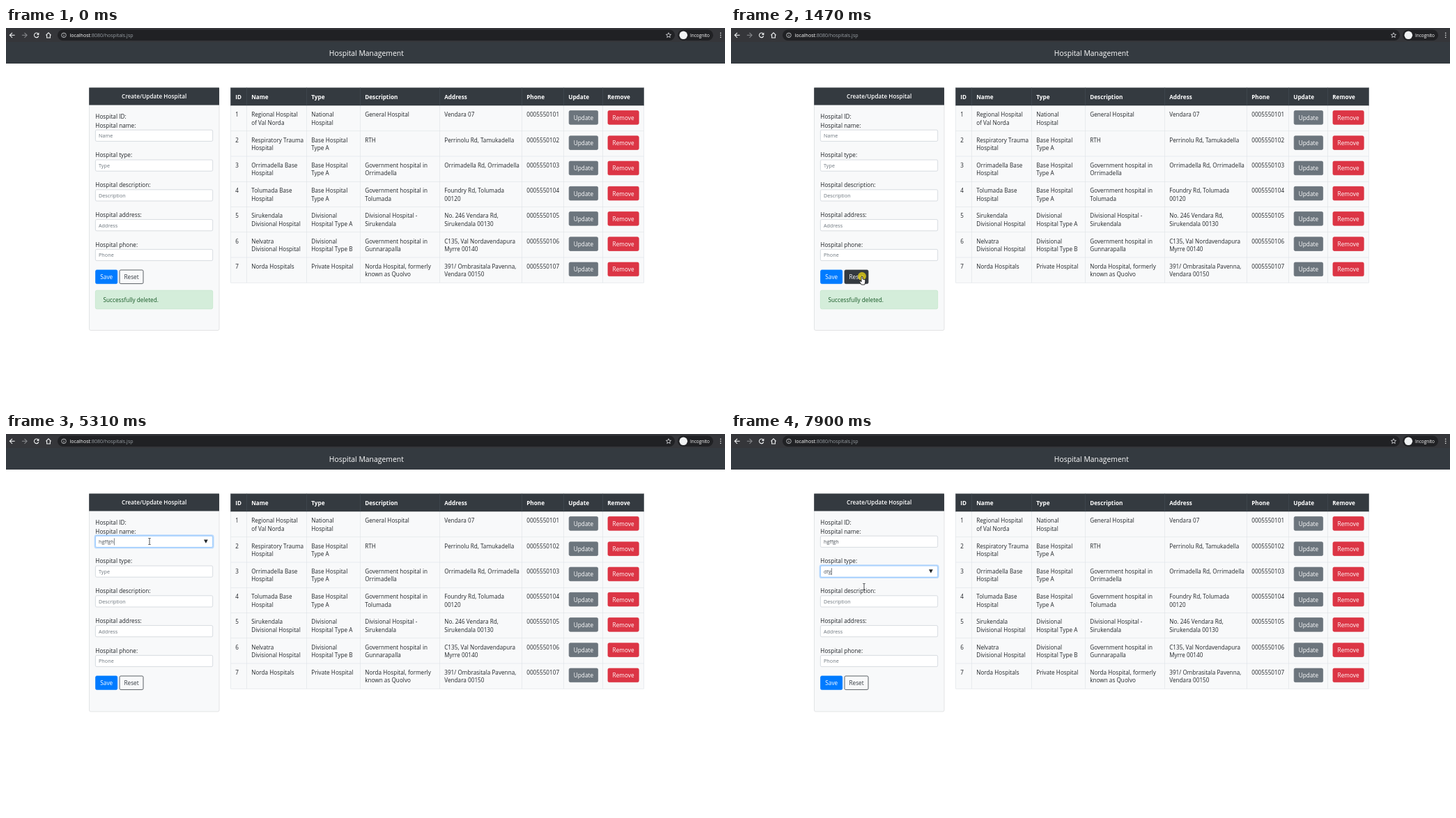
An HTML page with a canvas that plays this animation: 1032x542 px, repeating every 8 s.

```html
<!DOCTYPE html>
<html lang="en">
<head>
<meta charset="utf-8">
<title>Hospital Management</title>
<style>
  html, body { margin: 0; width: 100%; height: 100%; overflow: hidden; background: #fff; }
  canvas { display: block; }
</style>
</head>
<body>
<canvas id="stage" width="1032" height="542"></canvas>
<script>
const ctx = document.getElementById('stage').getContext('2d');
const LOOP = 8000, FIRST_STEP = 260, STEP = 93.2;
const DARK = '#343a40', INK = '#212529', LIGHT = '#f8f9fa', LINE = '#dee2e6';

const COLUMNS = [322.5, 345.5, 431.5, 508.5, 622.5, 740.5, 800.5, 856.5, 915.5];
const HEADINGS = ['ID', 'Name', 'Type', 'Description', 'Address', 'Phone', 'Update', 'Remove'];
const TABLE_TOP = 111.5, ROW_HEIGHT = 36.25;
const ROWS = [
  ['1', 'Regional Hospital\nof Val Norda', 'National\nHospital', 'General Hospital', 'Vendara 07', '0005550101'],
  ['2', 'Respiratory Trauma\nHospital', 'Base Hospital\nType A', 'RTH', 'Perrinolu Rd, Tamukadella', '0005550102'],
  ['3', 'Orrimadella Base\nHospital', 'Base Hospital\nType A', 'Government hospital in\nOrrimadella', 'Orrimadella Rd, Orrimadella', '0005550103'],
  ['4', 'Tolumada Base\nHospital', 'Base Hospital\nType A', 'Government hospital in\nTolumada', 'Foundry Rd, Tolumada\n00120', '0005550104'],
  ['5', 'Sirukendala\nDivisional Hospital', 'Divisional\nHospital Type A', 'Divisional Hospital -\nSirukendala', 'No. 246 Vendara Rd,\nSirukendala 00130', '0005550105'],
  ['6', 'Nelvatra\nDivisional Hospital', 'Divisional\nHospital Type B', 'Government hospital in\nGunnarapalla', 'C135, Val Nordavendapura\nMyrre 00140', '0005550106'],
  ['7', 'Norda Hospitals', 'Private Hospital', 'Norda Hospital, formerly\nknown as Quolvo', '391/ Ombrasitala Pavenna,\nVendara 00150', '0005550107']
];
const FIELDS = ['Name', 'Type', 'Description', 'Address', 'Phone'];
const FIELD_TOP = 146, FIELD_PITCH = 42.8, FIELD_HEIGHT = 16.6;
const ITEM_HEIGHT = 19.55;
const SUGGESTIONS = [
  ['Regional Hospital of Val Norda', 'Orrimadella Base Hospital', 'Tolumada Base Hospital',
    'Sirukendala Divisional Hospital', 'Nelvatra Divisional Hospital', 'Respiratory Trauma Hospital',
    'Belun Hospital', 'Ovenu Hospital', 'Norda Hospitals'],
  ['Private Hospital', 'National Hospital', 'Base Hospital Type A', 'Base Hospital Type B',
    'Divisional Hospital Type A', 'Divisional Hospital Type B']
];

// Pointer track: time, x, y
const TRACK = [
  [260, 436, 214], [540, 399, 256.8], [640, 372, 300], [730, 338, 385], [820, 302, 457],
  [910, 282, 446], [1010, 262, 416], [1110, 238, 392], [1300, 192, 360], [1400, 188, 356],
  [1870, 188, 356], [1960, 194, 325], [2230, 205, 152], [2690, 205, 152], [3000, 208, 171],
  [3250, 209, 175], [3530, 205, 155], [3810, 205, 156], [4090, 205, 156], [4180, 211, 150],
  [4450, 226, 131], [4540, 225, 133], [4920, 206, 154], [5500, 206, 154], [6060, 193, 198],
  [6420, 193, 198], [6700, 195, 217], [6900, 195, 217], [7080, 198, 224], [7360, 200, 199],
  [7730, 200, 199], [7900, 191, 219]
];
const PRESSES = [[1430, 1550], [2400, 2490], [6130, 6220]];
const RESET_AT = 1550, NAME_FOCUS = 2400, TYPE_FOCUS = 6130, TYPE_TYPED = 7520;
const NAME_KEYS = [4636, 4730, 4823, 4916, 5100, 5290];

const between = (v, a, b) => v >= a && v < b;
const fieldY = i => FIELD_TOP + i * FIELD_PITCH;

// Laid out large and scaled down so glyph spacing stays fractional.
function text(str, x, middle, size, color, { align = 'left', weight = 400 } = {}) {
  ctx.save();
  ctx.translate(x, middle + size * 0.36);
  ctx.scale(0.1, 0.1);
  ctx.font = `${weight} ${size * 10}px "Open Sans", "Noto Sans", sans-serif`;
  ctx.textAlign = align;
  ctx.fillStyle = color;
  ctx.fillText(str, 0, 0);
  const width = ctx.measureText(str).width / 10;
  ctx.restore();
  return width;
}

function box(x, y, w, h, r, fill, stroke, lineWidth = 0.8) {
  ctx.beginPath();
  ctx.roundRect(x, y, w, h, r);
  if (fill) { ctx.fillStyle = fill; ctx.fill(); }
  if (stroke) { ctx.strokeStyle = stroke; ctx.lineWidth = lineWidth; ctx.stroke(); }
}

function rect(x, y, w, h, fill) {
  ctx.fillStyle = fill;
  ctx.fillRect(x, y, w, h);
}

function poly(points, fill, stroke, lineWidth = 0.8, closed = true) {
  ctx.beginPath();
  points.forEach(([x, y]) => ctx.lineTo(x, y));
  if (closed) ctx.closePath();
  if (fill) { ctx.fillStyle = fill; ctx.fill(); }
  if (stroke) { ctx.strokeStyle = stroke; ctx.lineWidth = lineWidth; ctx.stroke(); }
}

function arc(x, y, r, fill, stroke, lineWidth = 1, from = 0, to = 7) {
  ctx.beginPath();
  ctx.arc(x, y, r, from, to);
  if (fill) { ctx.fillStyle = fill; ctx.fill(); }
  if (stroke) { ctx.strokeStyle = stroke; ctx.lineWidth = lineWidth; ctx.stroke(); }
}

function button(label, x, y, w, fill, color = '#fff', border = fill) {
  box(x, y, w, 19.6, 1.8, fill, border);
  text(label, x + w / 2, y + 10.2, 8.25, color, { align: 'center' });
}

function navArrow(x, dir, color) {
  poly([[x - 3.6 * dir, 10.3], [x + 3.6 * dir, 10.3]], null, color, 1.1, false);
  poly([[x, 6.8], [x + 3.6 * dir, 10.3], [x, 13.8]], null, color, 1.1, false);
}

function drawBrowser() {
  rect(0, 0, 1032, 20, '#35363a');
  box(74, 2.5, 886, 15.5, 7.7, '#202124');
  box(964, 2.5, 51, 15.5, 7.7, '#202124');
  navArrow(9, -1, '#f1f3f4');
  navArrow(26.5, 1, '#85878a');
  arc(43.7, 10.3, 3.2, null, '#f1f3f4', 1.1, 0.3, 5.5);
  poly([[47.4, 6.4], [47.4, 9.9], [43.9, 9.9]], '#f1f3f4');
  poly([[57.4, 10.4], [61, 6.8], [64.6, 10.4]], null, '#f1f3f4', 1.1, false);
  poly([[58.6, 9.8], [58.6, 14], [63.4, 14], [63.4, 9.8]], null, '#f1f3f4', 1.1, false);
  arc(83, 10.3, 3.3, null, '#d5d7da', 0.8);
  rect(82.6, 9.8, 0.8, 2.4, '#d5d7da');
  rect(82.6, 8.3, 0.8, 0.8, '#d5d7da');
  const host = text('localhost', 91.5, 10.4, 7.05, '#fff');
  text(':8080/hospitals.jsp', 91.5 + host, 10.4, 7.05, '#9aa0a6');
  const star = Array.from({ length: 10 }, (_, i) => {
    const a = i * Math.PI / 5 - Math.PI / 2, r = i % 2 ? 1.7 : 3.8;
    return [951 + r * Math.cos(a), 10.5 + r * Math.sin(a)];
  });
  poly(star, null, '#e1e3e6', 0.8);
  arc(972.3, 10.3, 5.8, '#f1f3f4');
  text('Incognito', 982, 10.4, 6.45, '#fff');
  for (const y of [7.3, 10.3, 13.3]) arc(1025.7, y, 0.8, '#f1f3f4');
  rect(0, 20, 1032, 31, DARK);
  text('Hospital Management', 517.3, 36.3, 10.4, '#fff', { align: 'center' });
}

function drawTable(pointer) {
  const left = COLUMNS[0], width = COLUMNS[8] - left;
  const inside = pointer && between(pointer.x, left, COLUMNS[8]);
  const hovered = inside ? Math.floor((pointer.y - TABLE_TOP) / ROW_HEIGHT) : -1;

  rect(left, 85.5, width, 26, DARK);
  HEADINGS.forEach((h, i) => text(h, COLUMNS[i] + 6.7, 98.8, 8.2, '#fff', { weight: 700 }));
  ROWS.forEach((row, r) => {
    const y = TABLE_TOP + r * ROW_HEIGHT;
    rect(left, y, width, ROW_HEIGHT, r === hovered ? '#e4e4e5' : LIGHT);
    row.forEach((cell, c) => cell.split('\n').forEach((line, n) =>
      text(line, COLUMNS[c] + 6.7, y + 13 + n * 11.4, 8.2, INK)));
    button('Update', 808.2, y + 7.1, 41.4, '#6c757d');
    button('Remove', 864, y + 7.1, 44.2, '#dc3545');
  });
  const bottom = TABLE_TOP + ROWS.length * ROW_HEIGHT;
  for (const x of COLUMNS) {
    rect(x - 0.3, 85.5, 0.6, 26, '#454d55');
    rect(x - 0.3, TABLE_TOP, 0.6, bottom - TABLE_TOP, LINE);
  }
  for (let r = 1; r <= ROWS.length; r++)
    rect(left, TABLE_TOP + r * ROW_HEIGHT - 0.3, width, 0.6, LINE);
}

function drawField(i, state) {
  const y = fieldY(i), focused = state.focus === i;
  if (focused) box(127.5, y - 0.8, 170.2, FIELD_HEIGHT + 1.6, 2.5, null, 'rgba(0,123,255,.25)', 1.7);
  box(128.4, y + 0.2, 168.3, FIELD_HEIGHT - 0.4, 1.8, '#fff', focused ? '#80bdff' : '#ced4da');
  const value = state.values[i], preview = focused && state.preview;
  const middle = y + 8.5;
  const width = text(value || preview || FIELDS[i], 133, middle, 7.25, value || preview ? '#495057' : '#6c757d');
  if (focused && state.caret) rect(133.2 + (value ? width : 0), y + 3.4, 0.7, 10, '#495057');
  if (i < 2 && (focused || state.hoverField === i))
    poly([[284, y + 5.4], [289.8, y + 5.4], [286.9, y + 10.8]], INK);
}

function drawForm(state) {
  const height = state.alert ? 348 : 312.5;
  box(119.5, 85.5, 186.5, height, 2, LIGHT, '#dcdddf');
  rect(119.2, 85.5, 186.8, 25, DARK);
  text('Create/Update Hospital', 212.6, 98.3, 8.2, '#fff', { align: 'center', weight: 600 });
  text('Hospital ID:', 128.3, 126.8, 8.25, INK);
  FIELDS.forEach((name, i) => {
    text(`Hospital ${name.toLowerCase()}:`, 128.3, fieldY(i) - 6.4, 8.25, INK);
    drawField(i, state);
  });
  button('Save', 128.6, 347, 31.2, '#007bff');
  if (state.resetFocus) box(162, 346, 36, 21.6, 3, null, 'rgba(52,58,64,.5)', 1.7);
  if (state.resetHover) button('Reset', 163, 347, 34, DARK);
  else button('Reset', 163, 347, 34, LIGHT, DARK, DARK);
  if (state.alert) {
    box(128.4, 376.2, 168.3, 26.6, 2, '#d4edda', '#c3e6cb');
    text('Successfully deleted.', 139.5, 389.8, 8.25, '#155724');
  }
}

function drawList(state) {
  if (state.list < 0) return;
  const items = SUGGESTIONS[state.list], top = fieldY(state.list) + 17.6;
  ctx.save();
  ctx.shadowColor = 'rgba(0,0,0,.2)';
  ctx.shadowBlur = 2;
  ctx.shadowOffsetY = 0.5;
  box(128.2, top, 168.6, items.length * ITEM_HEIGHT + 8.2, 1.5, '#292a2d');
  ctx.restore();
  items.forEach((item, i) => {
    const y = top + 4.4 + i * ITEM_HEIGHT;
    if (i === state.hoverItem) rect(128.2, y, 168.6, ITEM_HEIGHT, '#3f4042');
    text(item, 135, y + 9.8, 6.5, '#fff', { weight: 700 });
  });
}

function drawPointer({ x, y }, kind, pressed) {
  if (pressed) arc(x, y, 6, 'rgba(226,206,20,.8)');
  ctx.save();
  ctx.translate(x, y);
  ctx.lineJoin = 'round';
  if (kind === 'beam') {
    rect(-0.4, -4.6, 0.8, 9.2, INK);
    rect(-1.9, -4.9, 3.8, 0.6, INK);
    rect(-1.9, 4.3, 3.8, 0.6, INK);
  } else if (kind === 'hand') {
    poly([[-1, 0.8], [0, 0], [1, 0.8], [1, 4], [4.2, 4.8], [5, 6], [4.6, 9.2], [3.8, 12],
      [-0.8, 12], [-3.6, 8], [-3.4, 6.8], [-2.4, 6.8], [-1, 8]], '#fff', '#000', 0.8);
  } else {
    poly([[0, 0], [0, 8.6], [2, 6.9], [3.3, 9.8], [4.6, 9.2], [3.3, 6.4], [5.9, 6.1]], '#fff', INK, 0.7);
  }
  ctx.restore();
}

function pointerAt(t) {
  if (t < TRACK[0][0]) return null;
  const next = TRACK.findIndex(p => p[0] > t);
  if (next < 0) {
    const [, x, y] = TRACK[TRACK.length - 1];
    return { x, y };
  }
  const [t0, x0, y0] = TRACK[next - 1], [t1, x1, y1] = TRACK[next];
  const k = (t - t0) / (t1 - t0);
  return { x: x0 + (x1 - x0) * k, y: y0 + (y1 - y0) * k };
}

function stateAt(t, pointer) {
  const { x, y } = pointer || { x: -1, y: -1 };
  const focus = t < NAME_FOCUS ? -1 : t < TYPE_FOCUS ? 0 : 1;
  const typed = NAME_KEYS.filter(k => t >= k);
  const name = 'hgffgh'.slice(0, typed.length);
  const type = t >= TYPE_TYPED ? 'dfg' : '';
  const list = between(t, 2490, NAME_KEYS[0]) ? 0 : between(t, 6220, TYPE_TYPED) ? 1 : -1;
  const inForm = between(x, 128, 297);
  const hoverField = inForm ? FIELDS.findIndex((_, i) => between(y, fieldY(i), fieldY(i) + FIELD_HEIGHT)) : -1;

  let hoverItem = -1;
  if (list >= 0 && inForm) {
    const i = Math.floor((y - fieldY(list) - 22) / ITEM_HEIGHT);
    if (i < SUGGESTIONS[list].length) hoverItem = i;
  }
  const caretFrom = focus === 0 ? (typed.length ? typed[typed.length - 1] : NAME_FOCUS)
    : (type ? TYPE_TYPED : TYPE_FOCUS);
  return {
    focus, list, hoverField, hoverItem,
    values: [name, type],
    preview: hoverItem >= 0 ? SUGGESTIONS[list][hoverItem] : '',
    caret: Math.floor((t - caretFrom) / 530) % 2 === 0,
    alert: t < RESET_AT,
    resetFocus: between(t, RESET_AT, NAME_FOCUS),
    resetHover: between(x, 162, 198) && between(y, 346, 367)
  };
}

function draw(clock) {
  const t = clock < FIRST_STEP ? 0
    : FIRST_STEP + Math.floor((clock - FIRST_STEP) / STEP + 0.12) * STEP;
  const pointer = pointerAt(t);
  const state = stateAt(t, pointer);
  rect(0, 0, 1032, 542, '#fff');
  drawBrowser();
  drawTable(pointer);
  drawForm(state);
  drawList(state);
  if (!pointer) return;
  const overLabel = t > TYPE_TYPED && pointer.y > 214;
  const kind = state.resetHover ? 'hand' : state.hoverField >= 0 || overLabel ? 'beam' : 'arrow';
  drawPointer(pointer, kind, PRESSES.some(([a, b]) => between(t, a, b)));
}

function tick() {
  draw(performance.now() % LOOP);
  requestAnimationFrame(tick);
}
tick();
</script>
</body>
</html>
```
